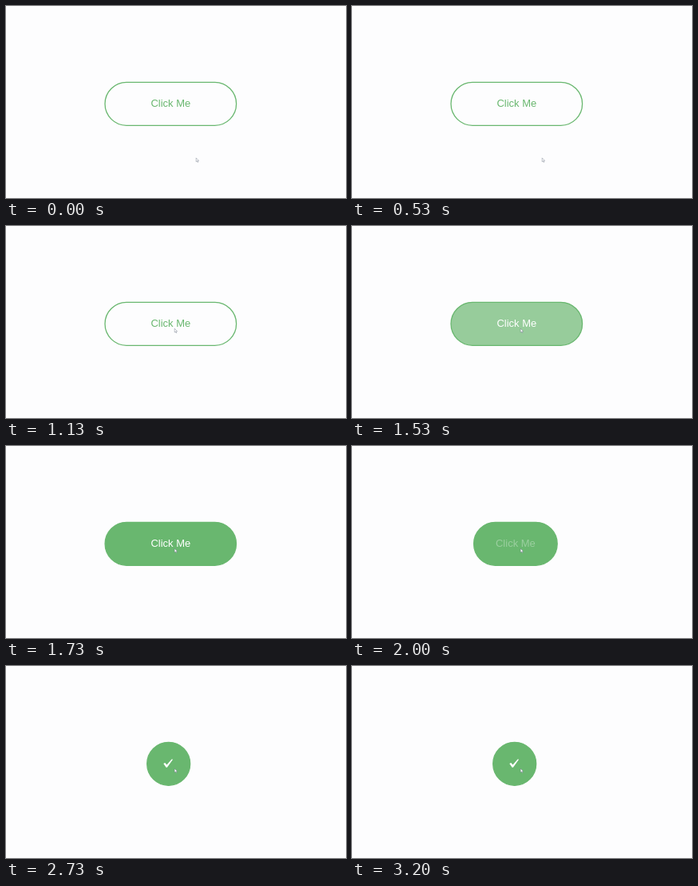
An HTML page with a canvas that plays this animation: 426 by 240 pixels, repeating every 3270 ms.

```html
<!DOCTYPE html>
<html lang="en">
<head>
<meta charset="utf-8">
<title>Button</title>
<style>
html, body { margin: 0; width: 100%; height: 100%; overflow: hidden; background: #fdfdfe; }
canvas { display: block; width: 426px; height: 240px; }
</style>
</head>
<body>
<canvas id="stage"></canvas>
<script>
const W = 426, H = 240, LOOP = 3270, STEP = 200 / 3;
const GREEN = '#69b76f';
const canvas = document.getElementById('stage');
const ctx = canvas.getContext('2d');
const dpr = window.devicePixelRatio || 1;
canvas.width = W * dpr;
canvas.height = H * dpr;

const lerp = (a, b, p) => a + (b - a) * p;
const span = (t, a, b) => Math.min(1, Math.max(0, (t - a) / (b - a)));
const ease = p => p * p * (3 - 2 * p);

function polygon(points) {
  ctx.beginPath();
  points.forEach(([x, y]) => ctx.lineTo(x, y));
  ctx.closePath();
}

function pill(left, right, top, bottom) {
  const r = (bottom - top) / 2, cy = top + r;
  ctx.beginPath();
  ctx.arc(left + r, cy, r, Math.PI / 2, Math.PI * 1.5);
  ctx.arc(right - r, cy, r, -Math.PI / 2, Math.PI / 2);
  ctx.closePath();
}

function label(x, color, alpha) {
  ctx.globalAlpha = alpha;
  ctx.fillStyle = color;
  ctx.font = '13px "Liberation Sans", Arial, sans-serif';
  ctx.textAlign = 'center';
  ctx.fillText('Click Me', x, 126.3);
  ctx.globalAlpha = 1;
}

function button(t) {
  const fill = ease(span(t, 1320, 1660));
  const shrink = ease(span(t, 1720, 2250));
  const left = lerp(124, 176.7, shrink);
  const right = lerp(288.6, 230.7, shrink);

  pill(left, right, 95.3, 149.3);
  ctx.fillStyle = GREEN;
  ctx.globalAlpha = fill;
  ctx.fill();
  ctx.globalAlpha = 1;
  ctx.strokeStyle = GREEN;
  ctx.lineWidth = 1.3;
  ctx.stroke();

  const x = (left + right) / 2;
  const shown = 1 - span(t, 1800, 2100);
  const white = span(t, 1320, 1500);
  if (white < 1) label(x, GREEN, 1 - white);
  if (white > 0) label(x, '#fff', white * shown);
}

function check(t) {
  ctx.globalAlpha = ease(span(t, 2200, 2500));
  ctx.fillStyle = '#fff';
  polygon([[197.3, 122], [199.2, 120.9], [201.5, 123.6], [207.6, 116.4], [209.1, 116.7], [201.9, 126.8], [200.6, 126.8]]);
  ctx.fill();
  ctx.globalAlpha = 1;
}

function pointer(t) {
  const p = ease(span(t, 590, 1110));
  ctx.save();
  ctx.translate(lerp(238.2, 211.2, p), lerp(189.9, 128.2, p));
  polygon([[0, 0], [0, 4.7], [1.1, 3.8], [1.9, 5.5], [2.7, 5.1], [2, 3.5], [3.4, 3.4]]);
  ctx.fillStyle = '#fff';
  ctx.fill();
  ctx.strokeStyle = 'rgba(90, 100, 120, 0.65)';
  ctx.lineWidth = 0.6;
  ctx.stroke();
  ctx.restore();
}

function draw(now) {
  const t = Math.min(48, Math.floor((now % LOOP + 5) / STEP)) * STEP;
  ctx.setTransform(dpr, 0, 0, dpr, 0, 0);
  ctx.fillStyle = '#fdfdfe';
  ctx.fillRect(0, 0, W, H);
  button(t);
  check(t);
  pointer(t);
}

let start;
function tick(now) {
  start ??= now;
  draw(now - start);
  requestAnimationFrame(tick);
}
draw(0);
requestAnimationFrame(tick);
</script>
</body>
</html>
```
